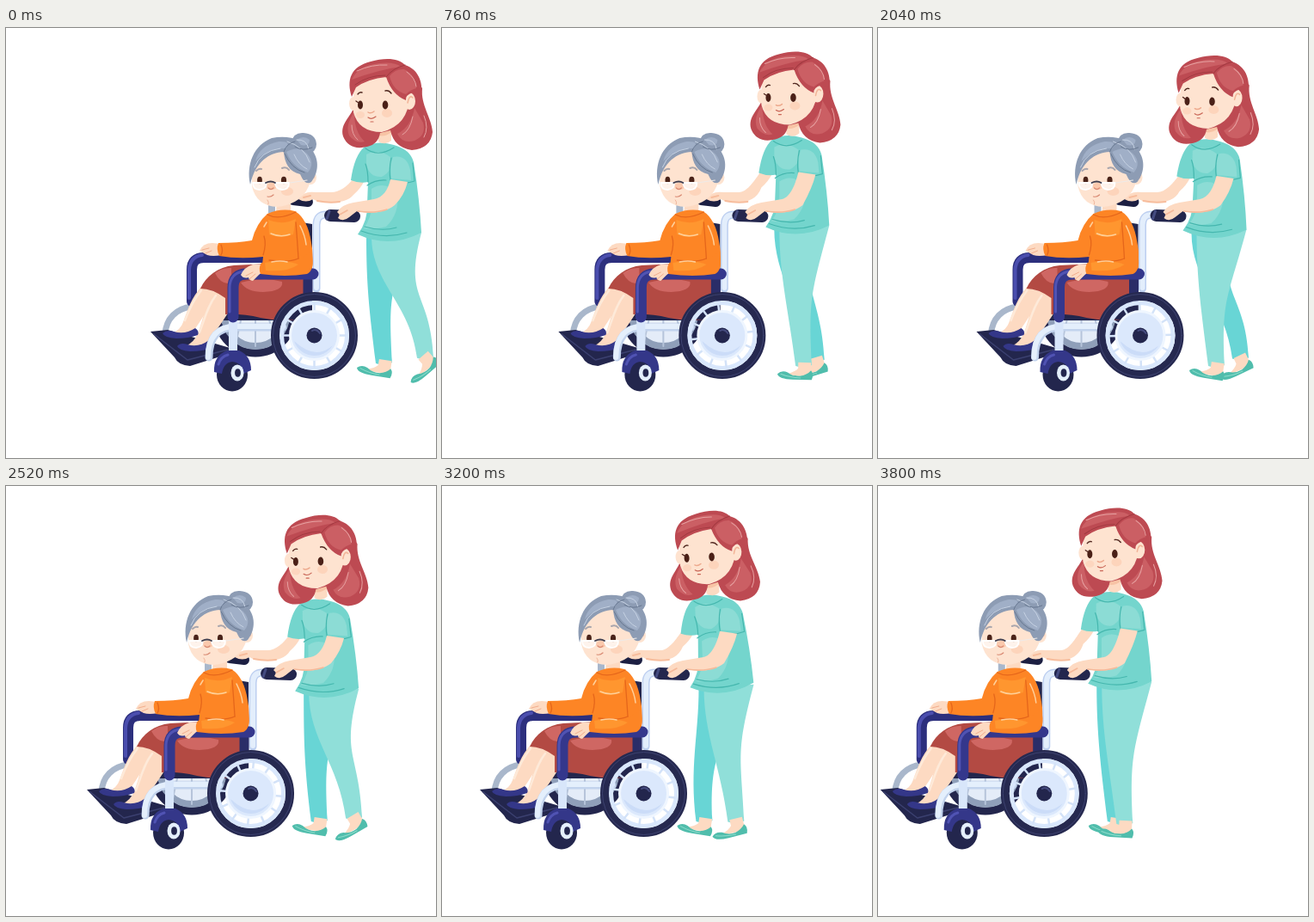
An HTML page that plays this animation: 500x500 px, repeating every 3.84 s.

```html
<!DOCTYPE html>
<html lang="en">
<head>
<meta charset="utf-8">
<title>Walk with a wheelchair</title>
<style>
html,body{margin:0;width:100%;height:100%;overflow:hidden;background:#fff}
svg{display:block;width:100vw;height:100vh}
.l{fill:none;stroke-linecap:round;stroke-linejoin:round}
.skin{fill:#fddac2}.face{fill:#fee3d0}.blush{fill:#fbc9ad}
.hair{fill:#bd4a52}.hair2{fill:#cb5f64}
.grey{fill:#8d9cb4}.grey2{fill:#a0afc7}
.dark{fill:#23264d}.navy{fill:#343789}
.top{fill:#74d5cd}.top2{fill:#8cdcd5}
.or{fill:#fd8525}.or2{fill:#ff962f}
</style>
</head>
<body>
<svg viewBox="0 0 500 500">
<g id="all">
  <!-- far side of the chair -->
  <g class="l">
    <circle cx="290" cy="334" r="44" stroke="#23264d" stroke-width="9"/>
    <circle cx="290" cy="334" r="36" stroke="#8f9fb9" stroke-width="8" fill="#e4ecf8"/>
    <path d="M290 334V370M275 331L268 363M304 331L312 363" stroke="#b6c4da" stroke-width="2"/>
    <path d="M216 324C198 326 186 338 185 356" stroke="#a9b7cb" stroke-width="7"/>
    <path d="M309 205V225" stroke="#a9b7cb" stroke-width="8"/>
    <path d="M216 318V281Q216 267 230 267H303" stroke="#2c2f7d" stroke-width="12"/>
    <path d="M213 314V281Q214 266 228 264" stroke="#4b4eae" stroke-width="4"/>
    <path d="M334 200L351 202" stroke="#1c1f42" stroke-width="12"/>
  </g>
  <path class="dark" d="M344 226L356 228V340H250L255 312H345Z"/>

  <!-- legs -->
  <path id="legD" fill="#68d5d5"/><g id="footD"></g>
  <path id="legL" fill="#90dfd9"/><g id="footL"></g>
  <path id="armF" class="skin"/>
  <path id="armFs" class="l" stroke="#f7bd9d" stroke-width="2"/>

  <!-- seated woman -->
  <path class="dark" d="M168 353L188 351L264 373L262 378L214 393Q200 392 196 383Z"/>
  <path d="M172 356L211 386L258 374" class="l" stroke="#3b4070" stroke-width="1.5"/>
  <path class="skin" d="M227 301L246 308C237 325 226 340 218 353Q206 359 193 355Q203 351 206 342C211 328 216 313 227 301Z"/>
  <path class="skin" d="M245 302L267 316C258 334 243 353 234 367Q222 374 209 370Q219 365 223 355C230 338 231 319 245 302Z"/>
  <path d="M208 340C213 327 219 315 227 305M225 354C231 338 235 322 244 311" class="l" stroke="#feead9" stroke-width="2.5"/>
  <path class="navy" d="M182 355Q187 350 195 353Q208 357 220 349Q225 352 223 357Q212 361 198 361Q184 360 182 355ZM199 370Q203 365 211 368Q224 372 236 363Q242 366 240 372Q229 376 214 376Q201 375 199 370Z"/>
  <path fill="#b34a43" d="M226 303C233 288 246 278 265 276L305 274L346 289V338Q320 342 296 337Q275 332 255 333V314Q240 303 226 303Z"/>
  <path fill="#cf6763" d="M243 285Q252 278 262 279V297Q250 299 243 285ZM273 296Q301 289 321 295Q323 306 299 307Q280 307 273 296Z"/>
  <path class="dark" d="M313 338Q318 323 333 315L356 307V340Z"/>
  <path class="skin" d="M225 259Q229 250 240 250L250 251L251 264Q240 266 234 264Z"/>
  <path d="M228 258L236 256M232 262L239 259" class="l" stroke="#f2ae8d" stroke-width="1"/>
  <path class="skin" d="M315 200H331V216Q321 222 314 215Z"/>
  <path class="or" d="M304 216Q320 209 336 213Q351 222 355 250Q361 282 350 287Q325 291 297 285L299 266Q270 269 248 265Q244 257 247 250Q270 250 286 247Q291 227 304 216Z"/>
  <path class="or2" d="M305 223Q321 230 337 222L334 240Q318 246 306 240Z"/>
  <g class="l" stroke="#e5661b" stroke-width="1.3"><path d="M299 264Q303 251 300 242M337 226Q339 251 340 268M304 217Q317 224 337 214M250 252Q253 259 250 264"/></g>
  <g class="l" stroke="#ffd09a" stroke-width="1.5"><path d="M308 239Q319 244 330 240M342 230Q348 242 349 252M303 226L300 231"/></g>

  <path class="face" d="M286 164Q296 139 323 139Q356 146 354 178Q347 204 316 208Q291 207 286 184Z"/>
  <ellipse class="face" cx="354" cy="174" rx="7" ry="8"/>
  <path d="M352 174Q357 169 358 174" class="l" stroke="#f2b598" stroke-width="1.5"/>
  <ellipse class="blush" cx="309" cy="184" rx="6" ry="4"/>
  <ellipse class="blush" cx="327" cy="190" rx="7" ry="5" opacity=".6"/>
  <path class="grey" d="M284 182C279 159 288 136 309 128C327 124 347 129 356 142C365 154 363 169 355 179Q348 184 342 170C329 167 324 157 323 144C306 145 290 155 284 182Z"/>
  <path class="grey" d="M332 133Q334 121 346 122Q360 123 361 135Q361 145 350 146Q338 144 332 133Z"/>
  <path class="grey2" d="M290 155Q294 137 317 132Q333 131 325 140Q305 139 290 155ZM326 144Q340 136 350 146Q360 157 351 168Q333 162 326 144ZM338 130Q346 124 353 130Q353 138 343 136Z"/>
  <g class="l" stroke="#c6d2e3" stroke-width="1"><path d="M289 162Q296 143 319 140M327 132Q347 138 353 156M335 147Q340 159 350 164M338 130Q350 129 352 141"/></g>
  <g class="l" stroke="#687891" stroke-width="1"><path d="M323 144Q326 134 336 132M324 146Q332 164 347 168M336 138Q346 144 356 139"/></g>
  <g fill="#4a2319"><ellipse cx="295" cy="177" rx="2.9" ry="4.3"/><ellipse cx="323" cy="177" rx="3.1" ry="4.3"/></g>
  <g class="l">
    <path d="M291 166Q294 163 297 164M321 163Q326 161 329 165" stroke="#a9a6ad" stroke-width="2"/>
    <g stroke="#fff" stroke-width="1.8" fill="#fff" fill-opacity=".6"><path d="M287 180H302Q304 187 295 188Q287 188 287 180ZM313 180H329Q329 188 321 188Q313 187 313 180Z"/></g>
    <path d="M302 180Q308 177 313 180" stroke="#3f3d4e" stroke-width="1.8"/>
    <path d="M330 180L350 177" stroke="#eeeae8" stroke-width="1.2"/>
    <path d="M305 186Q308 189 311 186M304 196Q308 197 311 194" stroke="#d98a73" stroke-width="1.2"/>
    <path d="M304 200Q306 202 305 205" stroke="#efb59c" stroke-width="1"/>
  </g>

  <!-- near side of the chair -->
  <g class="l">
    <path d="M361 303V229Q361 217 372 217" stroke="#bdcff0" stroke-width="9"/>
    <path d="M361 302V229Q361 217 372 217" stroke="#e3eefc" stroke-width="6"/>
    <path d="M236 383Q236 348 267 348H322" stroke="#c2d3ed" stroke-width="9"/>
    <path d="M235 383Q235 347 267 347H322" stroke="#e4effc" stroke-width="6"/>
    <path d="M264 335V376" stroke="#d8e6fa" stroke-width="10"/>
    <path d="M351 293V315" stroke="#2a2d68" stroke-width="11"/>
    <path d="M264 336V302Q264 286 280 286H357" stroke="#34378c" stroke-width="13"/>
    <path d="M260 330V301Q261 285 276 283" stroke="#5053b3" stroke-width="3"/>
    <path d="M377 218L405 219" stroke="#23264d" stroke-width="14"/>
    <path d="M376 213L373 222" stroke="#444b80" stroke-width="3"/>
  </g>
  <path class="skin" d="M273 287Q277 278 287 275L298 275Q300 284 294 287L287 294Q282 293 282 290Q276 292 273 287Z"/>
  <path d="M279 288L287 284M283 292L290 286" class="l" stroke="#f2ae8d" stroke-width="1"/>
  <path class="or" d="M297 273Q320 268 339 270L355 260Q360 281 350 286Q325 290 296 286Q293 279 297 273Z"/>
  <path class="or2" d="M301 273Q322 268 340 275Q328 284 302 282Z"/>
  <path d="M340 268Q329 273 306 270" class="l" stroke="#e5661b" stroke-width="1.3"/>
  <path d="M309 272Q319 270 327 272" class="l" stroke="#ffd09a" stroke-width="1.5"/>

  <ellipse class="dark" cx="263" cy="403" rx="18" ry="19.5"/>
  <path class="navy" d="M242 400Q241 381 257 375H271Q285 381 285 398L276 402Q275 389 263 388Q253 389 251 402Z"/>
  <path d="M247 391Q250 382 258 380" class="l" stroke="#5053b3" stroke-width="3"/>
  <ellipse cx="269" cy="401" rx="7.5" ry="9.5" fill="#e4effc"/><ellipse class="dark" cx="269.5" cy="401" rx="3.4" ry="4.7"/>
  <g class="l">
    <circle cx="358.5" cy="357.5" r="45.5" stroke="#262950" stroke-width="10"/>
    <circle cx="358.5" cy="357.5" r="48" stroke="#3d4270" stroke-width="1"/>
    <circle cx="358.5" cy="357.5" r="38" stroke="#d9e7fc" stroke-width="5"/>
    <g id="spokes" stroke="#d3e2f8" stroke-width="2.5"></g>
    <circle cx="358.5" cy="357.5" r="28" fill="#dbe8fc"/>
    <path d="M335 364A25 25 0 0 0 380 369Q360 387 335 364Z" fill="#cbdcf8"/>
    <circle cx="358.5" cy="357.5" r="28" stroke="#eff6ff" stroke-width="3"/>
  </g>
  <circle class="dark" cx="358.5" cy="357.5" r="9"/>
  <path d="M356 352Q361 349 365 355" class="l" stroke="#454b7e" stroke-width="2"/>

  <!-- nurse -->
  <g id="body">
    <path class="top" d="M417 138Q433 130 451 136Q470 141 474 156Q481 200 483 238Q446 257 409 240Q421 224 420 205L421 179Q411 181 401 177Q405 148 417 138Z"/>
    <path class="top2" d="M419 147Q432 139 447 150Q451 166 437 173Q422 174 419 158ZM425 187Q440 177 455 192Q458 216 442 231Q428 235 416 233Q425 220 425 207ZM450 150Q466 147 470 165L471 177L448 175Q446 159 450 150Z"/>
    <g class="l" stroke="#45b7ae" stroke-width="1.2"><path d="M418 140Q433 151 451 139M421 179Q421 166 418 158M448 151Q445 165 447 177Q460 183 475 178M420 183Q430 176 442 177M413 236Q440 246 466 238M417 231Q437 237 454 232M473 157L475 178"/></g>
    <path class="skin" d="M433 112H448V131Q441 137 433 132Z"/>
    <path d="M433 120Q440 121 448 114V121Q441 127 433 125Z" fill="#f7c3a5"/>
    <path class="hair" d="M405 91C401 104 388 111 392 126Q399 143 420 138Q433 135 435 122L447 119Q451 139 472 142Q494 140 496 121C495 104 482 90 484 70L468 50Z"/>
    <path class="hair2" d="M405 98Q394 113 399 125Q407 135 417 132Q405 121 405 98ZM475 93Q471 115 455 123Q461 135 475 131Q489 125 485 110Z"/>
    <ellipse class="face" cx="404" cy="88" rx="5" ry="8"/>
    <path class="face" d="M404 79Q404 56 430 50Q463 54 469 80Q468 113 437 121Q410 121 404 98Z"/>
    <ellipse class="face" cx="469" cy="85" rx="7" ry="10"/>
    <path d="M467 87Q469 77 473 81" class="l" stroke="#f2b598" stroke-width="1.5"/>
    <path class="hair" d="M402 80C396 61 400 45 424 39C441 34 457 35 464 43C479 48 485 62 483 78L473 75Q464 78 465 84Q449 78 442 57Q421 59 407 69Z"/>
    <path class="hair2" d="M402 60Q409 44 434 41Q452 39 459 45Q435 48 402 60ZM446 56Q453 47 463 48Q476 54 477 70Q470 72 465 77Q450 73 446 56Z"/>
    <g class="l" stroke="#a23940" stroke-width="1"><path d="M442 57Q449 47 464 43M406 66Q421 55 441 55"/></g>
    <g class="l" stroke="#e7a1a1" stroke-width="1"><path d="M408 50Q425 42 443 43M466 51Q476 58 477 68M486 102Q492 116 486 127M402 113Q402 124 409 130M473 103Q470 119 461 124"/></g>
    <ellipse class="blush" cx="412" cy="101" rx="5" ry="4" opacity=".5"/><ellipse class="blush" cx="443" cy="99" rx="6" ry="5" opacity=".6"/>
    <g fill="#4a2017"><ellipse cx="412" cy="89.5" rx="3" ry="5"/><ellipse cx="441" cy="89.5" rx="3.3" ry="5"/></g>
    <g class="l"><path d="M410 87L407 85M409 77Q411 74 414 75M441 73Q445 72 448 76" stroke="#512820" stroke-width="1.4"/>
    <path d="M421 98Q424 100 428 97" stroke="#eda98d" stroke-width="1.5"/><path d="M421 104Q425 107 430 103M424 109L427 109" stroke="#c96657" stroke-width="1.2"/></g>
  </g>
  <path id="armN" class="skin"/>
  <path id="armNs" class="l" stroke="#f5b99a" stroke-width="1.5"/>
</g>
</svg>
<script>
const $ = id => document.getElementById(id);
const LOOP = 3840, HOME = 360;

// time, chair x, body bob, body lean, near ankle, far ankle (from the hub)
const KEYS = [
  [0, 360, 0, 0, 125, 77],
  [200, 351.5, -7, 0, 96, 99],
  [400, 342.5, -10, 1, 70.5, 119],
  [560, 336, -3, 0, 71, 126],
  [840, 324, -10, 0, 99, 97],
  [1120, 313, -5.5, -1.5, 122, 79],
  [1400, 308, -7, 0, 97, 95],
  [1680, 306.7, -3, 1, 73, 119],
  [2040, 306.5, -4, 1, 84.5, 112.5],
  [2240, 304.5, -7, 0, 104, 92],
  [2480, 289, -2, -1, 120, 73],
  [2760, 267, -6, -2, 74, 108],
  [2920, 255.5, -7.5, -2.5, 90, 80],
  [3360, 225, -7, -4, 108, 62],
  [3480, 217, -6.5, -4, 102, 64],
  [3840, 192, -11, 0, 88, 81]
];

const slope = (i, c) => {
  const a = KEYS[Math.max(0, i - 1)], b = KEYS[Math.min(KEYS.length - 1, i + 1)];
  return (b[c] - a[c]) / (b[0] - a[0]);
};

function sample(t, c) {
  let i = 0;
  while (i < KEYS.length - 2 && KEYS[i + 1][0] <= t) i++;
  const a = KEYS[i], b = KEYS[i + 1], d = b[0] - a[0], u = (t - a[0]) / d, v = 1 - u;
  return v * v * (1 + 2 * u) * a[c] + u * u * (3 - 2 * u) * b[c]
    + d * u * v * (v * slope(i, c) - u * slope(i + 1, c));
}

const shoe = `<path class="skin" d="M-7-5H8V8Q-4 13-20 9Q-10 6-7 2Z"/>
  <path fill="#50bdac" d="M-31 9Q-26 4-19 7Q-12 12-4 11Q4 9 8 4Q12 8 9 15H-13Q-29 15-31 9Z"/>
  <path class="l" stroke="#8ddccb" d="M-27 9Q-16 13-4 13"/>`;
$('footL').innerHTML = $('footD').innerHTML = shoe;

for (let i = 0; i < 12; i++) {
  $('spokes').innerHTML += `<path d="M358.5 331V321" transform="rotate(${i * 30} 358.5 357.5)"/>`;
}

function leg(side, rel, left, right, hip, floor, lean) {
  const x = HOME + rel + 3, y = floor - Math.max(0, rel - 95) * .31;
  const tilt = Math.min(9, (92 - rel) * 1.25);
  const l = left - lean, r = right - lean;
  $('leg' + side).setAttribute('d',
    `M${l} ${hip}C${l} ${hip + 55} ${x - 18} ${y - 65} ${x - 10} ${y - 1}
     Q${x} ${y + 3} ${x + 9} ${y - 2}C${x + 5} ${y - 80} ${r - 21} ${hip + 75} ${r} ${hip - 4}Z`);
  $('foot' + side).setAttribute('transform', `translate(${x} ${y}) rotate(${tilt})`);
}

function arms(b) {
  const p = (x, y) => `${x} ${y + b}`;
  $('armF').setAttribute('d',
    `M${p(403, 176)}C${p(397, 184)} 388 191 378 191L360 191Q346 189 340 199
     Q349 204 357 199L363 202C382 205 398 202 ${p(404, 194)}Q${p(412, 187)} ${p(416, 179)}Z`);
  $('armFs').setAttribute('d', 'M346 197L354 195M362 201Q376 204 388 202');
  $('armN').setAttribute('d',
    `M${p(447, 176)}C${p(444, 189)} 438 197 428 199L404 203Q391 205 385 214
     L388 217L386 221Q392 226 399 220L408 213C425 217 442 214 452 206Q${p(463, 195)} ${p(467, 179)}Z`);
  $('armNs').setAttribute('d', 'M388 217L397 212M409 213Q428 216 443 211');
}

function draw(t) {
  const [x, bob, lean, near, far] = [1, 2, 3, 4, 5].map(c => sample(t, c));
  $('all').setAttribute('transform', `translate(${x - HOME} 0)`);
  $('body').setAttribute('transform', `translate(0 ${bob}) rotate(${lean * .75} 445 165)`);
  $('spokes').setAttribute('transform', `rotate(${(x - HOME) / 50 * 180 / Math.PI} 358.5 357.5)`);
  leg('D', far, 419, 468, 242 + bob, 391, lean);
  leg('L', near, 425, 483, 242 + bob, 394, lean);
  arms(bob);
}

const start = performance.now();
function tick() {
  const t = (performance.now() - start) % LOOP;
  draw(Math.floor(t / 40) * 40);
  requestAnimationFrame(tick);
}
draw(0);
requestAnimationFrame(tick);
</script>
</body>
</html>
```
